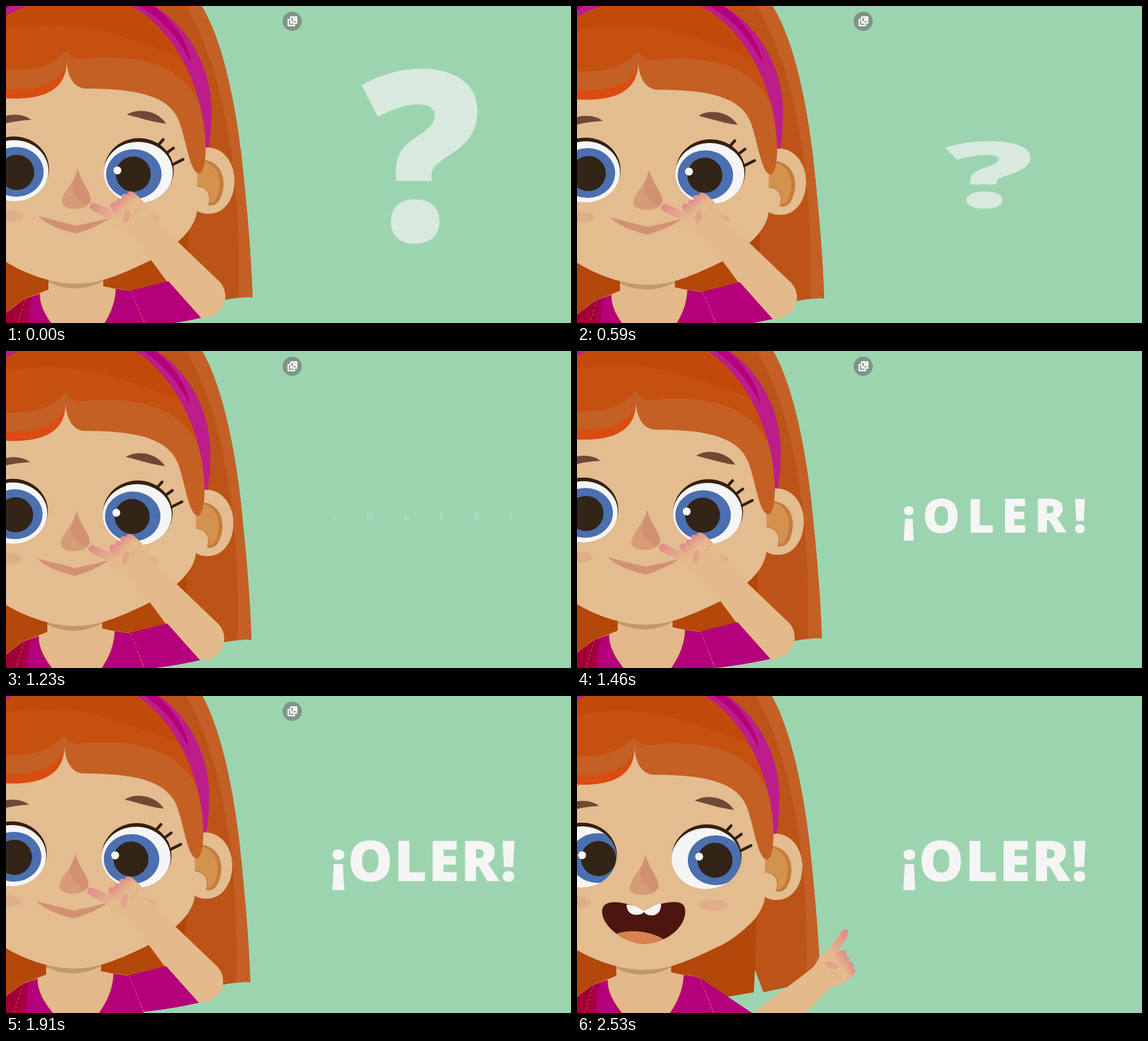
An HTML page for the animation above (2610 ms loop, 999x560 px).

```html
<!DOCTYPE html>
<html lang="es">
<head>
<meta charset="utf-8">
<title>¡Oler!</title>
<style>
html, body { margin: 0; width: 100%; height: 100%; overflow: hidden; background: #9dd4b0; }
svg { display: block; width: 999px; height: 560px; }
text { font-family: "Open Sans", "Noto Sans", sans-serif; font-weight: 800; fill: #f5f5f5; text-anchor: middle; }
</style>
</head>
<body>
<svg viewBox="0 0 999 560">
  <defs>
    <clipPath id="clipL"><ellipse cx="14" cy="291" rx="61" ry="54"/></clipPath>
    <clipPath id="clipR"><ellipse cx="234" cy="294" rx="61" ry="54"/></clipPath>
    <clipPath id="clipMouth"><use href="#lips"/></clipPath>
    <linearGradient id="tip" x1="0" y1="0" x2="0" y2="1">
      <stop offset="0" stop-color="#e18a8b"/>
      <stop offset=".3" stop-color="#e29a8c"/>
      <stop offset=".85" stop-color="#e4b98b"/>
    </linearGradient>
  </defs>
  <rect width="999" height="560" fill="#9dd4b0"/>

  <g id="girl">
    <!-- back hair -->
    <path fill="#bc5417" d="M-40,-30H328L346,0C390,72 411,208 419,290C428,375 434,450 436,515Q428,512 388,519L335,530L320,490L318,530L230,545H-40Z"/>
    <path fill="#c46025" d="M300,-30H328L346,0C390,72 411,208 419,290C428,375 434,450 436,515Q428,513 411,516C416,330 395,130 318,0Z"/>
    <path fill="#b4470a" d="M-40,380H323L320,490L318,530L230,545H-40Z"/>

    <!-- neck and dress -->
    <path fill="#e3b98c" d="M75,470H172V495L196,500V600H50V511L75,501Z"/>
    <path fill="#b4007a" stroke="#c9783f" stroke-width="1" d="M194,499L221,503L250,575H164C180,553 193,530 194,499Z"/>
    <path fill="#b4007a" stroke="#c9783f" stroke-width="1" d="M-40,572L0,542L33,517L60,508C59,530 72,552 92,575H-40Z"/>
    <path fill="#a80044" d="M-40,572L0,543L33,518L47,514Q39,535 40,575H-40Z"/>
    <path fill="#a00033" d="M-40,572L0,543L33,518L38,517Q27,550 27,575H-40Z"/>
    <path fill="none" stroke="#d0569c" stroke-dasharray="5 3" d="M34,518L18,570"/>

    <!-- ear -->
    <path fill="#e3bc90" d="M330,258C340,249 352,249 360,250C388,253 404,280 404,308C404,345 383,368 357,367C345,367 336,362 330,356Z"/>
    <path fill="#c67c3d" d="M330,274C345,268 366,272 377,287C387,302 387,322 379,340C374,350 367,354 357,352C364,333 355,316 330,319Z"/>
    <path fill="#d4924f" d="M330,279C345,271 361,275 371,289C380,303 380,321 373,337C369,346 364,349 360,348C364,330 354,315 330,317Z"/>

    <!-- face -->
    <path fill="#c09a6b" d="M75,482L172,482V486Q125,511 75,488Z"/>
    <path fill="#e3bc90" d="M-40,90H330L338,260V360C336,384 320,403 301,419C284,434 270,443 254,450C226,464 196,477 172,484Q124,497 75,484C48,477 20,465 0,452L-40,430Z"/>
    <ellipse cx="8" cy="371" rx="22" ry="10" fill="#dfae89"/>
    <ellipse cx="245.500" cy="376" rx="25" ry="10" fill="#dfae89"/>

    <!-- front hair -->
    <path fill="#d94c12" d="M107,97C108,137 82,168 0,163L-40,160V120H80Z"/>
    <path fill="#c46024" d="M-40,-30H200C300,30 350,140 353,245C353,278 349,294 341,296C325,293 319,240 307,206C292,164 245,146 145,146C122,147 109,128 107,97C104,128 70,150 0,147L-40,144Z"/>
    <path fill="#c55010" d="M-40,-30H200C295,25 340,110 350,196C330,120 265,84 150,92C130,95 116,96 107,77C90,100 60,116 0,113L-40,108Z"/>
    <path fill="#c2490a" d="M-40,-30H200C270,10 310,50 327,99C290,82 240,65 190,49C130,30 60,30 0,40L-40,48Z"/>
    <path fill="#bd1d8b" d="M200,-12H240L262,0C330,42 367,120 363,195C363,218 361,236 358,250H353C352,150 298,36 215,-3Z"/>
    <path fill="#b4007a" d="M224,-8H250L268,6C302,35 324,70 327,100C307,60 278,24 236,0Z"/>
    <path fill="#bd1d8b" d="M-20,-20H70L38,0C22,5 8,12 -20,30Z"/>
    <path fill="#b4007a" d="M-20,-20H30L8,0L-20,16Z"/>

    <!-- brows, nose -->
    <path fill="#6e4a36" d="M214,192C230,180 268,183 283,208C262,206 235,197 214,192ZM-30,215C-10,188 25,187 45,201C25,202 5,205 -30,215Z"/>
    <path fill="#d69c76" d="M127,288C132,311 150,327 150,343C147,356 130,359 118,358C107,357 99,353 99,346C100,327 119,317 127,288Z"/>
    <path fill="#d19170" d="M127,288C132,311 150,327 150,343C148,349 142,351 137,348C122,338 113,326 119,310Z"/>

    <!-- eyes -->
    <ellipse cx="14" cy="287.500" rx="62" ry="57" fill="#35200f"/>
    <ellipse cx="14" cy="291" rx="61" ry="54" fill="#f5f5f5"/>
    <ellipse cx="235" cy="290.500" rx="61.500" ry="57" fill="#35200f"/>
    <ellipse cx="234" cy="294" rx="61" ry="54" fill="#f5f5f5"/>
    <g clip-path="url(#clipL)"><g class="gaze">
      <ellipse cx="17.500" cy="293" rx="49" ry="44" fill="#4b6faf"/>
      <circle cx="19" cy="294" r="31" fill="#322416"/>
      <circle cx="-10" cy="288" r="7" fill="#f8f8f8"/>
    </g></g>
    <g clip-path="url(#clipR)"><g class="gaze">
      <ellipse cx="226" cy="297" rx="49" ry="44" fill="#4b6faf"/>
      <circle cx="225" cy="297" r="31" fill="#322416"/>
      <circle cx="197" cy="290.500" r="7" fill="#f8f8f8"/>
    </g></g>
    <path stroke="#35200f" stroke-width="5" stroke-linecap="round" d="M269,246L278,236M285,259L296,251M295,280L313,271"/>

    <!-- mouths -->
    <path id="smile" fill="#d29271" d="M57,371Q90,380 124,388Q155,382 185,374C165,388 140,397 124,402C100,396 74,388 57,371Z"/>
    <g id="open" transform="translate(5 8.300)">
      <path id="lips" fill="#4c160f" d="M45,382C44,365 56,362 74,363C92,365 104,372 120,378C134,372 146,364 164,363C184,361 192,365 192,380C190,414 150,436 120,436C84,436 47,406 45,382Z"/>
      <path fill="#f5f5f5" d="M88,367C100,368 110,373 120,378C130,373 139,367 149,365C150,378 143,386 133,386C126,386 122,384 119,380C116,384 111,385 105,385C95,385 88,378 88,367Z"/>
      <path clip-path="url(#clipMouth)" fill="#d98250" d="M66,420C90,410 130,412 156,430L140,450H70Z"/>
    </g>

    <!-- arm, with the sleeve over the elbow -->
    <g id="arm" fill="#e4b98b">
      <path d="M-22,-170L-37,0A37.500,37.500 0 0 0 38,0L24,-170Z"/>
      <g id="hand">
        <path d="M-23,6C-20,-12 -30,-20 -28,-34C-26,-46 -14,-52 0,-52L34,-47C38,-34 36,-16 26,-6L23,6Z"/>
        <path fill="url(#tip)" d="M-9,-42L-22,-87C-25,-95 -36,-93 -35,-84L-25,-36Z"/>
        <g fill="url(#tip)">
          <ellipse cx="30" cy="-43" rx="6.500" ry="12"/>
          <ellipse cx="20" cy="-47" rx="7.500" ry="13"/>
          <ellipse cx="8" cy="-48" rx="8" ry="13"/>
          <ellipse cx="-4" cy="-50" rx="8.500" ry="15"/>
        </g>
        <ellipse cx="-3" cy="-30" rx="12" ry="5.500" fill="#e29a8c" opacity=".7" transform="rotate(-28 -3 -30)"/>
        <path fill="none" stroke="#d9a67c" d="M2,-26Q8,-18 14,-26Q20,-18 25,-26Q31,-20 34,-28"/>
      </g>
    </g>
    <path id="sleeve" fill="#b4007a"/>
    <path fill="none" stroke="#d0569c" stroke-dasharray="5 3" d="M222,504L248,566"/>
  </g>

  <text id="mark" x="735" y="415" font-size="420" opacity=".67">?</text>
  <text id="word">¡OLER!</text>

  <g id="icon" fill="none" stroke="#fff" stroke-width="2.300">
    <circle cx="506" cy="27" r="17" fill="#7d9587" stroke="none"/>
    <path d="M503.500,19.500H514V30H503.500ZM502,24H499V34.500H510V31.500M505.500,28.500L511,23M507,22.500H511.500V27"/>
  </g>
</svg>
<script>
const LOOP = 2610;
const $ = id => document.getElementById(id);
const clamp = v => Math.max(0, Math.min(1, v));
const span = (t, a, b) => clamp((t - a) / (b - a));
const smooth = u => u * u * (3 - 2 * u);
const mix = (a, b, k) => a.map((v, i) => v + (b[i] - v) * k);
const show = (el, on) => el.setAttribute('visibility', on ? 'visible' : 'hidden');

// picture steps: start, end, count
const steps = [[0, 0, 1], [70, 590, 8], [670, 920, 4], [1000, 1150, 3], [1230, 1690, 7],
  [1770, 1910, 3], [1990, 2220, 4], [2300, 2530, 4]]
  .flatMap(([a, b, n]) => Array.from({ length: n }, (_, i) => n > 1 ? a + (b - a) * i / (n - 1) : a));

// body sway: time, x, y
const sway = [[0, 0, 0], [590, 1, 2], [920, -.3, -1], [1460, -3, -7],
  [1910, -4, -9], [2220, -5, -8.3], [2530, -5.5, -6.8], [2610, -5.5, -6.3]];

function swayAt(t) {
  let i = 0;
  while (i < sway.length - 2 && t >= sway[i + 1][0]) i++;
  const slope = (k, c) => {
    const a = sway[Math.max(0, k - 1)], b = sway[Math.min(sway.length - 1, k + 1)];
    return (b[c] - a[c]) / (b[0] - a[0]);
  };
  const p = sway[i], q = sway[i + 1], d = q[0] - p[0], u = (t - p[0]) / d;
  return [1, 2].map(c => p[c] + (q[c] - p[c]) * smooth(u)
    + d * u * (1 - u) * (slope(i, c) * (1 - u) - slope(i + 1, c) * u));
}

// elbow x, y, forearm angle, wrist angle, sleeve hem top and bottom
const poses = [
  [350, 513, -41.6, -8.4, 287, 486, 345, 551],
  [330.5, 609, 2.4, -2.4, 298, 545, 298, 600],
  [311, 617, 48, -1, 335, 580, 300, 620]
];

function drawArm(t) {
  const rise = span(t, 1930, 2220), swing = span(t, 2220, 2530);
  const [ex, ey, fore, wrist, ax, ay, bx, by] = t < 2220
    ? mix(poses[0], poses[1], rise * rise)
    : mix(poses[1], poses[2], swing * (2 - swing));
  $('arm').setAttribute('transform', `translate(${ex} ${ey}) rotate(${fore})`);
  $('hand').setAttribute('transform', `translate(0 -168) rotate(${wrist})`);
  $('sleeve').setAttribute('d',
    `M220,503L${ax},${ay}L${bx},${by}Q${(bx + 245) / 2},${by + 11} 247,567Z`);
}

function drawMark(t) {
  const p = span(t, 300, 670) ** 2;
  show($('mark'), p < 1);
  $('mark').setAttribute('transform',
    `translate(712 319) scale(${1 - .427 * p} ${1 - p}) translate(-712 -319)`);
}

// letters grow while the gaps close, so the line keeps its width
function drawWord(t) {
  const s = 1 - (1 - span(t, 1190, 1690)) ** 2.3, gap = 2.3 + 60 * (1 - s), word = $('word');
  show(word, t >= 1220);
  word.setAttribute('font-size', 100 * s);
  word.setAttribute('letter-spacing', gap);
  word.setAttribute('x', 738 + gap / 2);
  word.setAttribute('y', 291.5 + 35.7 * s);
  word.setAttribute('opacity', span(t, 1190, 1390));
}

function draw(time) {
  const t = steps.filter(s => s <= time + .5).pop();
  $('girl').setAttribute('transform', `translate(${swayAt(t)})`);
  const look = 24.5 * smooth(span(t, 1960, 2200));
  document.querySelectorAll('.gaze').forEach(g => g.setAttribute('transform', `translate(${look} 0)`));
  show($('smile'), t < 2060);
  show($('open'), t >= 2060);
  drawArm(t);
  drawMark(t);
  drawWord(t);
  $('icon').setAttribute('transform', `translate(0 ${-46 * span(t, 2170, 2450) ** 2})`);
}

const begin = performance.now();
function tick() {
  draw((performance.now() - begin) % LOOP);
  requestAnimationFrame(tick);
}
tick();
</script>
</body>
</html>
```
